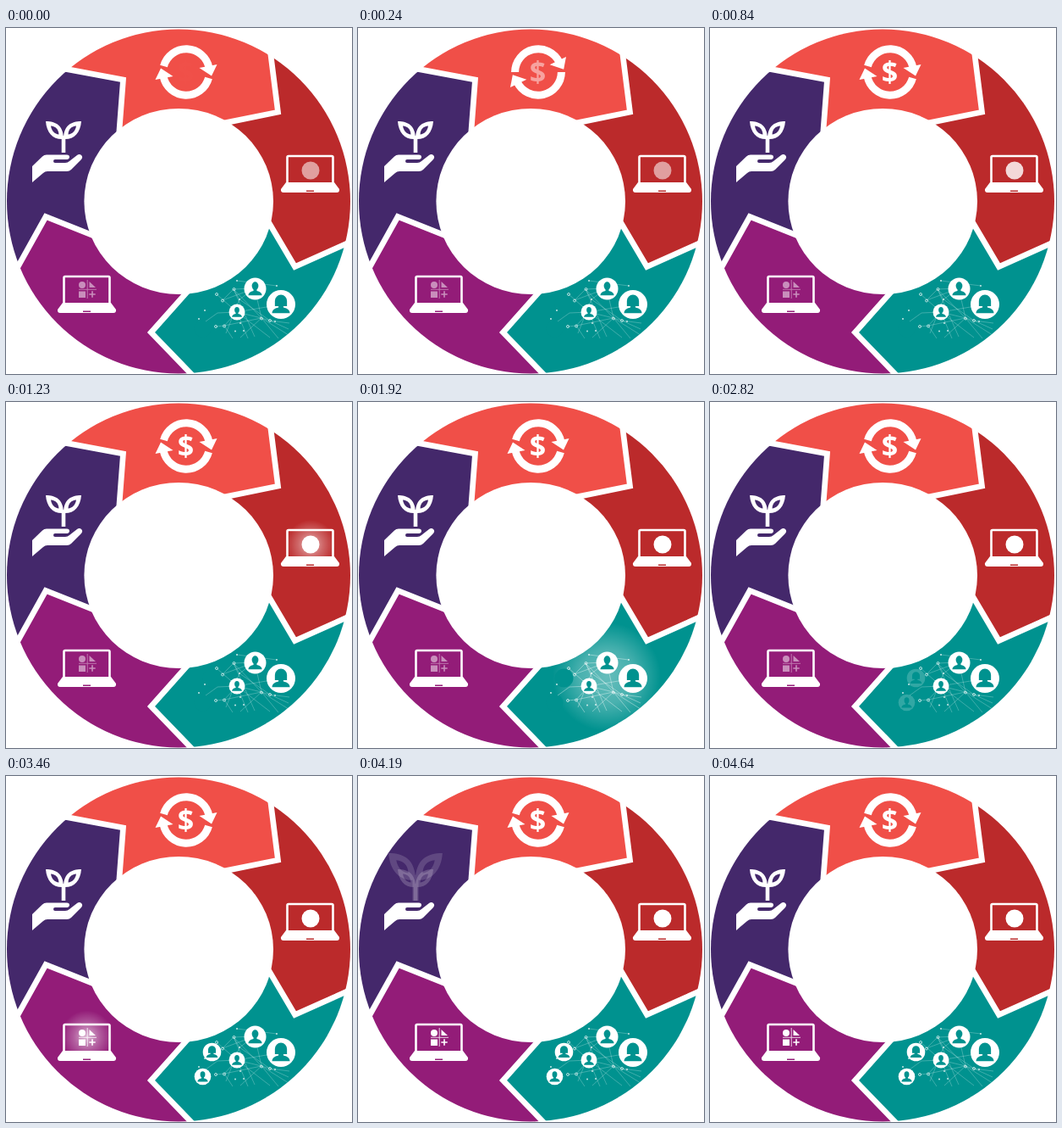
Write an HTML page that moves like this. It is 409x408 px and loops after 5210 ms.

```html
<!DOCTYPE html>
<html lang="en">
<head>
<meta charset="utf-8">
<title>Cycle</title>
<style>
  html, body { margin: 0; width: 100%; height: 100%; overflow: hidden; background: #fff; }
  svg { display: block; width: 100%; height: 100%; }
</style>
</head>
<body>
<svg viewBox="0 0 409 408">
  <defs>
    <radialGradient id="halo">
      <stop offset="0" stop-color="#fff" stop-opacity=".7"/>
      <stop offset=".5" stop-color="#fff" stop-opacity=".3"/>
      <stop offset="1" stop-color="#fff" stop-opacity="0"/>
    </radialGradient>
    <radialGradient id="wideHalo">
      <stop offset="0" stop-color="#fff" stop-opacity=".5"/>
      <stop offset=".5" stop-color="#fff" stop-opacity=".36"/>
      <stop offset="1" stop-color="#fff" stop-opacity="0"/>
    </radialGradient>
    <clipPath id="disc"><circle cx="204" cy="204.5" r="203"/></clipPath>
    <clipPath id="tealArea"><polygon id="tealShape"/></clipPath>
    <g id="laptop" fill="#fff">
      <rect x="332.500" y="151" width="54" height="34" rx="1.500" fill="none" stroke="#fff" stroke-width="2.600"/>
      <path d="M331 182H388L394 190Q394.500 194 391 194H328Q324.500 194 325 190Z"/>
    </g>
    <g id="arrow">
      <path d="M186.500 45A27.500 27.500 0 0 1 240 47" fill="none" stroke="#fff" stroke-width="9"/>
      <path d="M228.500 47L249.500 43L243 56.500Z" fill="#fff"/>
    </g>
    <path id="leaf" d="M47 110C59 110 68 115 68 131C56 132 48 124 47 110ZM53 115.500C54 121.500 57.500 125 62.500 125.500C62 119.500 59 116 53 115.500Z" fill-rule="evenodd"/>
    <g id="plant" fill="#fff">
      <use href="#leaf"/>
      <use href="#leaf" transform="matrix(-1 0 0 1 136 0)"/>
      <path d="M65.700 127H70.300V147H65.700Z"/>
    </g>
    <g id="man" fill="#00928f">
      <circle r="10" fill="#fff"/>
      <ellipse cy="-2.600" rx="3" ry="3.700"/>
      <path d="M-1.500 0H1.500V2Q6.200 3 6.200 6H-6.200Q-6.200 3-1.500 2Z"/>
    </g>
    <g id="woman" fill="#00928f">
      <circle r="10" fill="#fff"/>
      <path d="M-4.200 1.200V-2.500A4.200 4.200 0 0 1 4.200-2.500V1.200H1.700V2Q6.200 3 6.200 6H-6.200Q-6.200 3-1.700 2V1.200Z"/>
    </g>
  </defs>

  <g clip-path="url(#disc)">
    <g id="segments"></g>
    <g clip-path="url(#tealArea)">
      <circle id="smallGlow" cx="294" cy="324" r="64" fill="url(#wideHalo)"/>
      <circle id="largeGlow" cx="294" cy="324" r="86" fill="url(#wideHalo)"/>
    </g>
  </g>
  <g id="gaps" fill="none" stroke="#fff" stroke-width="6.700"></g>
  <ellipse cx="204.200" cy="204.500" rx="111.800" ry="109.500" fill="#fff"/>

  <g id="arrows"><use href="#arrow"/><use href="#arrow" transform="rotate(180 213 52)"/></g>
  <text id="dollar" x="212.500" y="64" text-anchor="middle" font-family="Open Sans, Arial, sans-serif" font-weight="700" font-size="34" fill="#fff">$</text>

  <circle id="redGlow" cx="360" cy="168" r="29" fill="url(#halo)"/>
  <use href="#laptop"/>
  <path d="M355 191.500H364V193H355Z" fill="#bb2a2b"/>
  <circle id="badge" cx="360" cy="168" r="10.500" fill="#fff"/>

  <g fill="#00928f"><circle cx="243.500" cy="325.500" r="11"/><circle cx="232.500" cy="354.500" r="10"/></g>
  <g id="network" stroke="#fff" fill="none"></g>
  <use href="#man" transform="translate(294.500 307.500) scale(1.300)"/>
  <use href="#woman" transform="translate(325 326) scale(1.700)"/>
  <use href="#man" transform="translate(273 335) scale(.95)"/>
  <g id="newcomers">
    <use href="#woman" transform="translate(243.500 325.500) scale(1.080)"/>
    <use href="#man" transform="translate(232.500 354.500) scale(.98)"/>
  </g>

  <circle id="purpleGlow" cx="95.500" cy="307.500" r="31" fill="url(#halo)"/>
  <use href="#laptop" x="-264" y="142"/>
  <path d="M91 333.500H100V335H91Z" fill="#931c78"/>
  <g id="shapes" fill="#fff">
    <circle cx="90" cy="303" r="4"/>
    <path d="M98.500 299V306H106ZM86 310.500H94V318H86ZM101.200 310.300H102.800V313.200H105.700V314.800H102.800V317.700H101.200V314.800H98.300V313.200H101.200Z"/>
    <path d="M96.200 297V319M86 308.300H107" stroke="#fff" opacity=".8"/>
  </g>

  <path fill="#fff" d="M31 163L43 151.500Q45 149.500 48 149.500H72Q75 149.500 75 152Q75 154.500 72 155H58Q56 155 56 157Q56 159 58 159H70Q73 159 75 157L84 150Q87 148 89.500 150.500Q91 152.500 89 155L77 167Q75 169 72 169H49Q46 169 44 171L31 182Z"/>
  <use id="oldPlant" href="#plant"/>
  <use id="newPlant" href="#plant"/>
</svg>
<script>
const LOOP = 5210;
const $ = id => document.getElementById(id);
const CENTER = [204, 204.5];

// Each gap runs from the outer edge through its tip to the inner edge.
const gaps = [
  [[74, 49], [138.5, 61], [134, 120]],
  [[313, 32], [321.5, 99.2], [262, 111.2]],
  [[401, 255], [341.5, 281.5], [312.5, 232.5]],
  [[218, 407], [171.5, 359], [212, 313.5]],
  [[15.5, 279], [47, 222.5], [101.5, 244]]
];
const colors = ['#f04f48', '#bb2a2b', '#00928f', '#931c78', '#44286b'];
const extend = (from, to, k) => from.map((v, i) => v + (to[i] - v) * k);

const areas = gaps.map(([outer, tip, inner], i) => {
  const [outer2, tip2, inner2] = gaps[(i + 1) % gaps.length];
  return [extend(CENTER, outer, 2), outer, tip, inner, CENTER,
          inner2, tip2, outer2, extend(CENTER, outer2, 2)].join(' ');
});
$('segments').innerHTML = areas.map((area, i) => `<polygon points="${area}" fill="${colors[i]}"/>`).join('');
$('tealShape').setAttribute('points', areas[2]);
$('gaps').innerHTML = gaps.map(([outer, tip, inner]) =>
  `<polyline points="${[extend(tip, outer, 1.3), tip, extend(tip, inner, 1.2)].join(' ')}"/>`).join('');

const rings = [[249, 314], [256, 321.5], [269.5, 308], [302, 342.5], [312, 345], [248, 352], [258, 351.5]];
const dots = [[320, 304], [228, 343], [277, 348], [271, 357.5], [281, 357], [309, 379], [318, 346], [276, 320], [235, 333], [273, 298]];
const web = 'M269 308L302 342L334 362M269 308L294 364M273 298L320 304M249 314L273 335L302 342' +
  'M256 321L294 307L269 308M276 320L294 307L302 342L312 345M236 346L250 336L273 335' +
  'M258 351L302 342L277 365M248 352L258 351L268 366M273 335L312 365M273 335L325 326' +
  'M302 342L322 366M312 345L335 348M276 320L312 345L334 355M258 351L273 335L286 366' +
  'M256 321L269 308L276 320L260 360';
$('network').innerHTML = `<path id="web" d="${web}" stroke-width=".6"/>` +
  rings.map(([x, y]) => `<circle cx="${x}" cy="${y}" r="1.5" stroke-width=".8" opacity=".85"/>`).join('') +
  dots.map(([x, y]) => `<circle cx="${x}" cy="${y}" r=".9" fill="#fff" stroke="none" opacity=".85"/>`).join('');

const ramp = (t, start, end) => Math.min(1, Math.max(0, (t - start) / (end - start)));
const smooth = p => p * p * (3 - 2 * p);
const pulse = (t, start, end) => Math.sin(Math.PI * ramp(t, start, end));
const fade = (id, value) => $(id).setAttribute('opacity', value);

function draw(t) {
  const spin = ramp(t, 0, 510);
  $('arrows').setAttribute('transform', `rotate(${360 * smooth(spin)} 213 52)`);
  fade('dollar', spin);

  fade('badge', .55 + .45 * ramp(t, 660, 960));
  fade('redGlow', pulse(t, 1080, 1350));

  const smallGlow = pulse(t, 1650, 2160);
  const largeGlow = pulse(t, 2190, 2550);
  fade('smallGlow', .8 * smallGlow);
  fade('largeGlow', largeGlow);
  fade('web', .42 + .2 * Math.max(smallGlow, largeGlow));
  fade('newcomers', ramp(t, 2790, 2950));

  fade('shapes', .5 + .5 * ramp(t, 3190, 3430));
  fade('purpleGlow', pulse(t, 3190, 3640));

  // The sapling fades out and returns enlarged, settling back onto the hand.
  fade('oldPlant', 1 - smooth(ramp(t, 4040, 4250)));
  fade('newPlant', ramp(t, 4040, 4580) ** 1.5);
  const scale = 1.53 - .53 * smooth(ramp(t, 4150, 4580));
  $('newPlant').setAttribute('transform', `translate(68 147) scale(${scale}) translate(-68 -147)`);
}

function tick() {
  draw(performance.now() % LOOP);
  requestAnimationFrame(tick);
}
tick();
</script>
</body>
</html>
```
